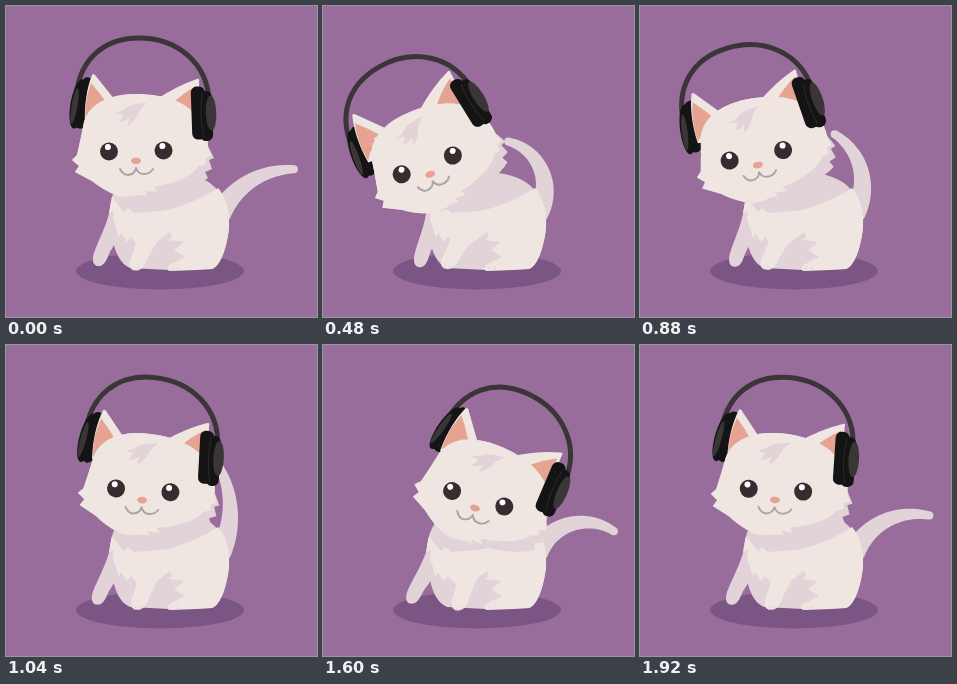
An HTML page with a canvas that plays this animation: 311x311 px, repeating every 1960 ms.

```html
<!DOCTYPE html>
<html lang="en">
<head>
<meta charset="utf-8">
<title>Kitten with headphones</title>
<style>
html, body { margin: 0; width: 100%; height: 100%; overflow: hidden; background: #986d9c; }
canvas { display: block; width: 311px; height: 311px; }
</style>
</head>
<body>
<canvas id="stage" width="311" height="311"></canvas>
<script>
const ctx = document.getElementById('stage').getContext('2d');
const LOOP = 1960, STEP = 40, HALF = LOOP / 2, LEFT = 495;
const RAD = Math.PI / 180;
const LIGHT = '#efe6e1', SHADE = '#e1d3d7', PINK = '#e6a392';
const BLACK = '#151415', GREY = '#3a3536', EYE = '#372c30';

function fill(d, color) {
  ctx.fillStyle = color;
  ctx.fill(new Path2D(d));
}

function line(d, color, width) {
  ctx.strokeStyle = color;
  ctx.lineWidth = width;
  ctx.lineCap = ctx.lineJoin = 'round';
  ctx.stroke(new Path2D(d));
}

function oval(x, y, rx, ry, color, deg = 0) {
  ctx.fillStyle = color;
  ctx.beginPath();
  ctx.ellipse(x, y, rx, ry, deg * RAD, 0, 7);
  ctx.fill();
}

function swung(x, y, deg, draw) {
  ctx.save();
  ctx.translate(x, y);
  ctx.rotate(deg * RAD);
  ctx.translate(-x, -y);
  draw();
  ctx.restore();
}

function pill(x, y, w, h, r, deg, color) {
  swung(x, y, deg, () => {
    ctx.fillStyle = color;
    ctx.beginPath();
    ctx.roundRect(x - w / 2, y - h / 2, w, h, r);
    ctx.fill();
  });
}

// Sway runs from -1 (left) to 1 (right) and back, cubic in and out.
function sway(t) {
  const p = ((t - LEFT) % LOOP + LOOP) % LOOP / HALF;
  const q = p > 1 ? 2 - p : p;
  const e = q < 0.5 ? 4 * q ** 3 : 1 - 4 * (1 - q) ** 3;
  return 2 * e - 1;
}

// Parts of the head share one path; x and y add a parallax of [linear, square].
const FACE = { lag: 0, turn: 18.5, x: [0, 0.5], y: [0, 0] };
const SKULL = { lag: 0, turn: 22, x: [-2, 2], y: [0, 0] };
const EARS = { lag: 8, turn: 25, x: [0, 0.5], y: [-1, -2.7] };
const PHONES = { lag: 8, turn: 27.5, x: [-2.4, 4], y: [-2.7, -1.1] };

const center = (c, { x, y }) => [
  130 + (26 + x[0]) * c + x[1] * c * c,
  144 + (y[0] - 2.5) * c + (11.5 + y[1]) * c * c
];

// Shapes inside are written in the coordinates of the pose at time 0.
function posed(t, part, draw) {
  const c = sway(t - part.lag), c0 = sway(-part.lag);
  const [x, y] = center(c, part), [x0, y0] = center(c0, part);
  ctx.save();
  ctx.translate(x - x0, y - y0);
  swung(130, 144, part.turn * (c - c0), draw);
  ctx.restore();
}

// Tail keys: time, heading at the root, heading at the tip (degrees from up).
const TAIL = [
  [0, 28, 92], [240, 25, -15], [600, 33, -90], [720, 33, -80],
  [1040, 26, -30], [1280, 32, 79], [1600, 26, 126], [1920, 26, 104]
];

function tailKey(i) {
  const n = TAIL.length, k = TAIL[(i + n) % n];
  return [k[0] + Math.floor(i / n) * LOOP, k[1], k[2]];
}

function tailHeading(t, j) {
  let i = TAIL.length - 1;
  while (TAIL[i][0] > t) i--;
  const [a, b, c, d] = [i - 1, i, i + 1, i + 2].map(tailKey);
  const span = c[0] - b[0], u = (t - b[0]) / span;
  const slope = (p, q, r) => {
    const s1 = (q[j] - p[j]) / (q[0] - p[0]), s2 = (r[j] - q[j]) / (r[0] - q[0]);
    return s1 * s2 <= 0 ? 0 : 2 * s1 * s2 / (s1 + s2);
  };
  const m1 = slope(a, b, c) * span, m2 = slope(b, c, d) * span;
  return b[j] * (1 + 2 * u) * (1 - u) ** 2 + m1 * u * (1 - u) ** 2
    + c[j] * u * u * (3 - 2 * u) + m2 * u * u * (u - 1);
}

function tail(t) {
  const h0 = tailHeading(t, 1), h1 = tailHeading(t, 2);
  const n = 28, len = 91, near = [], far = [];
  let x = 214, y = 208, r = 0;
  for (let i = 0; i <= n; i++) {
    const u = i / n, h = (h0 + (h1 - h0) * u) * RAD;
    r = 11 - 7 * u;
    near.push([x - Math.cos(h) * r, y - Math.sin(h) * r]);
    far.unshift([x + Math.cos(h) * r, y + Math.sin(h) * r]);
    if (i < n) {
      x += Math.sin(h) * len / n;
      y -= Math.cos(h) * len / n;
    }
  }
  ctx.fillStyle = SHADE;
  ctx.beginPath();
  near.concat(far).forEach(p => ctx.lineTo(...p));
  ctx.fill();
  oval(x, y, r, r, SHADE);
}

function body(c) {
  swung(108, 208, 5 * c, () =>
    fill('M104 203 C101 219 93 233 88 247 C85 257 89 261 94 260 C99 259 101 253 104 246 L116 226 Z', SHADE));
  fill('M112 178 C104 190 101 208 106 228 C108 245 114 258 124 262 L163 264 L206 263 C215 260 221 240 223 222 C224 198 213 178 192 171 Q182 167 170 167 Z', SHADE);
  fill('M106 191 L103 207 L108 205 L107 213 L113 232 L115 227 L121 236 L125 231 L131 238 L148 238 L164 226 L166 231 L162 234 L178 236 L168 244 L179 251 L163 259 Q159 265 165 265 L190 264 L206 263 C215 260 221 240 223 222 C224 204 220 191 212 182 Q192 195 166 203 Q152 206 140 206 L128 207 L122 202 L118 206 Z', LIGHT);
  swung(142, 206, -6 * c, () => {
    fill('M130 208 C133 224 131 238 125 251 C122 259 123 264.5 130 264.5 C136 264.5 139 259 141 254 C145 244 152 236 158 222 L160 207 Z', LIGHT);
    line('M128 261 L127 264 M133 261 L132 264', SHADE, 1);
  });
  line('M167 261 L165 264 M172 261 L171 264', SHADE, 1);
}

function phonesBack() {
  line('M70 98 C70 54 98 32 133 32 C171 32 202 57 203 96', GREY, 5);
  oval(72, 98, 7.5, 25, BLACK, 10);
  pill(78, 97, 12, 52, 6, 10, BLACK);
  oval(68.5, 100, 3, 18, GREY, 10);
}

function phonesFront() {
  pill(192.5, 107, 14, 53, 6, -2, BLACK);
  pill(200, 110, 13, 50, 6, -2, BLACK);
  line('M196 88 Q193 108 198 131', '#2c2829', 1);
  oval(205, 107, 5.3, 17.5, GREY, -2);
}

function ears() {
  fill('M79 118 C78 98 81 82 86 69 Q87 67 89 69 L109 94 L112 122 Z', LIGHT);
  fill('M85 77 Q94 87 102 99 L94 99 L99 106 L90 104 L92 111 L86 109 L80 116 C78 102 81 88 85 77 Z', PINK);
  fill('M148 95 Q170 80 191 73 Q194 72 193 76 L194 122 L168 124 Z', LIGHT);
  fill('M166 98 Q177 87 190 80 L190 113 L182 104 L180 109 L176 100 L171 103 Z', PINK);
}

function skull() {
  const crown = 'M78 116 C84 97 104 88 130 88 C160 88 181 97 192 111 ';
  const jaw = 'Q97 184 86 175 L69 166 L73 160 L66 154 L71 149 Q75 132 78 116 Z';
  fill(crown + 'C200 122 202 133 202 140 L208 152 L203 154 L206 163 L199 166 L202 172 C190 181 170 186 152 188 L149 191 Q136 194 124 192 L112 190 ' + jaw, SHADE);
  fill(crown + 'C200 122 202 133 202 142 L205 150 L199 152 L200 158 L193 160 C186 170 170 177 148 181 L151 186 L139 185 L142 189 L133 189 Q124 192 112 190 ' + jaw, LIGHT);
  fill('M108 107 Q115 107 121 101 Q130 97 141 97 Q135 101 132 108 Q129 115 122 120 L123 112 Q118 116 113 116 L117 109 Z', SHADE);
}

function face(c) {
  for (const [x, y] of [[103, 145.5], [157.5, 144.5]]) {
    oval(x, y, 9, 9, EYE);
    swung(x, y, -30 * c, () => oval(x - 1, y - 4.4, 3, 3, '#fff'));
  }
  oval(130, 154.8, 5, 3.3, PINK);
  line('M114 163 Q117 169 122 169 Q129 168 130 162 Q132 168 138 168 Q144 168 147 163', '#aaa4a4', 1.9);
}

function render(t) {
  const c = sway(t);
  ctx.fillStyle = '#986d9c';
  ctx.fillRect(0, 0, 311, 311);
  oval(154, 265, 84, 18.5, '#7b5685');
  tail(t);
  body(c);
  posed(t, PHONES, phonesBack);
  posed(t, EARS, ears);
  posed(t, SKULL, skull);
  posed(t, FACE, () => face(c));
  posed(t, PHONES, phonesFront);
}

const start = performance.now();
function tick() {
  const t = (performance.now() - start) % LOOP;
  render(Math.floor(t / STEP) * STEP);
  requestAnimationFrame(tick);
}
tick();
</script>
</body>
</html>
```
